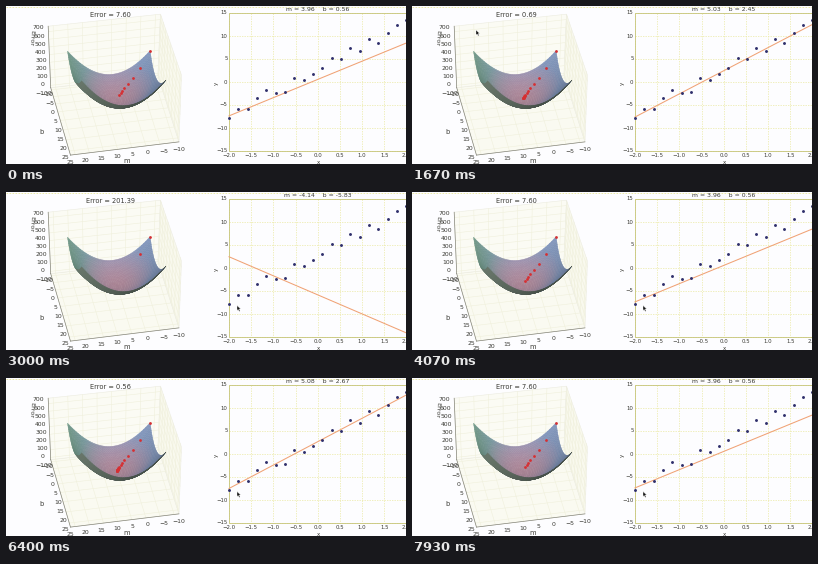
A matplotlib script for the animation above (8 s loop, 400x158 px).

```python
import numpy as np
import matplotlib.pyplot as plt
from matplotlib.animation import FuncAnimation
from matplotlib.collections import PolyCollection
from matplotlib.patches import Polygon, Rectangle

W, H, DPI = 400, 158, 100
FRAMES, INTERVAL = 160, 50
M_FIT, B_FIT, NOISE, X_VAR = 5.10, 2.83, 0.5335, 28 / 19
START, RATE = -8, 0.2
CYCLE, STEP_MS, RESTART = 21, 185, 2530

fig = plt.figure(figsize=(W / DPI, H / DPI), dpi=DPI, facecolor="#fdfdff")
ax = fig.add_axes([0, 0, 1, 1])
ax.set_xlim(0, W)
ax.set_ylim(H, 0)
ax.axis("off")


def label(x, y, s, size=4.4, ha="center", rot=0, color="#3a3a34", z=6):
    return ax.text(x, y, s, fontsize=size, ha=ha, va="center", rotation=rot,
                   color=color, zorder=z)


def signed(v):
    return str(v).replace("-", "\u2212")


def line(xs, ys, color, lw=0.5, z=1, **kw):
    return ax.plot(xs, ys, color=color, lw=lw, zorder=z, **kw)[0]


def error(m, b):
    return NOISE + X_VAR * (m - M_FIT) ** 2 + (b - B_FIT) ** 2


def project(m, b, z):
    """Perspective view of (m, b, error) in stage pixels."""
    u, v = (25 - m) / 35, (b + 10) / 35
    w = 0.75 * v / (1 - 0.25 * v)
    x = (1 - u) * (50 + 18 * w) + u * (148 + 19 * w) + z / 700 * 4 * (u - 0.5)
    y = (1 - u) * (81 + 61 * w) + u * (70 + 60 * w) - z * (0.077 + 0.006 * w)
    return x, y


def mix(a, b, t):
    return np.array(a) * (1 - t) + np.array(b) * t


# ---- error surface -------------------------------------------------------
LO, HI, BASE, TOP = -11.7, 26.7, -30, 770
PANES = [([(HI, LO, BASE), (LO, LO, BASE), (LO, HI, BASE), (HI, HI, BASE)], "#fafaf1"),
         ([(HI, LO, BASE), (LO, LO, BASE), (LO, LO, TOP), (HI, LO, TOP)], "#fbfbf4"),
         ([(LO, LO, BASE), (LO, HI, BASE), (LO, HI, TOP), (LO, LO, TOP)], "#f9f9ee")]
for corners, tone in PANES:
    ax.add_patch(Polygon([project(*c) for c in corners], facecolor=tone,
                         edgecolor="#ecece0", lw=0.4, zorder=0))


def grid3(*pts, color="#f0f0dc", lw=0.4):
    xs, ys = zip(*(project(*p) for p in pts))
    line(xs, ys, color, lw)


for t in range(-10, 30, 5):
    grid3((t, HI, BASE), (t, LO, BASE), (t, LO, TOP))
    grid3((HI, t, BASE), (LO, t, BASE), (LO, t, TOP))
for z in range(0, 800, 100):
    grid3((HI, LO, z), (LO, LO, z), (LO, HI, z))
for end in ((LO, HI, BASE), (HI, LO, BASE)):
    grid3((HI, HI, BASE), end, color="#85857a", lw=0.5)
grid3((HI, LO, BASE), (HI, LO, TOP), color="#85857a", lw=0.5)

for i in range(-1, 8):
    label(37 - 0.6 * i, 79 - 8.15 * i, signed(100 * i))
for i in range(8):
    label(64 + 15.57 * i, 156 - 1.8 * i, signed(25 - 5 * i))
    label(41 + 2.7 * i, 88 + 9.1 * i, signed(5 * i - 10))
label(36, 126, "b", 4.8)
label(121, 155, "m", 4.8)
label(25, 32, "Error", 4.6, rot=266)


def surface():
    grid = np.linspace(-8, 20.8, 41)
    quads, tones = [], []
    for b0, b1 in zip(grid, grid[1:]):
        for m1, m0 in zip(grid[::-1], grid[-2::-1]):
            q = np.array([project(m, b, error(m, b))
                          for m, b in ((m1, b0), (m0, b0), (m0, b1), (m1, b1))])
            d, e = q[2] - q[0], q[3] - q[1]
            m, b = (m0 + m1) / 2, (b0 + b1) / 2
            u, v = (20.8 - m) / 28.8, (b + 8) / 28.8
            if d[0] * e[1] - d[1] * e[0] > 0:
                rim = mix((110, 148, 132), (126, 146, 182), min(1, 2 * u))
                c = mix((178, 138, 156), rim, min(1, error(m, b) / 230))
                c = c * (1.04 - 0.25 * v)
            else:
                c = mix((104, 118, 106), (70, 80, 72), min(1, 1.6 * u))
            quads.append(q)
            tones.append(np.clip(c / 255, 0, 1))
    return PolyCollection(quads, facecolors=tones, edgecolors=tones,
                          linewidths=0.3, zorder=2)


ax.add_collection(surface())
path = line([], [], "#d62f32", 0, 4, marker="o", ms=2.0, mew=0)
err_title = label(104.5, 8.6, "", 4.8)

# ---- regression plot -----------------------------------------------------
X0, Y0, SX, SY = 311.7, 76, 44.35, 4.6


def plot_xy(x, y):
    return X0 + SX * np.asarray(x), Y0 - SY * np.asarray(y)


DOTS = dict(linestyle=(0, (2, 1.6)))
for i in range(-4, 5):
    x = X0 + SX * i / 2
    line([x, x], [7, 145], "#ebe9a4", 0.5, **DOTS)
    label(x, 149.5, signed(i / 2), 3.9)
for v in range(-15, 16, 5):
    y = Y0 - SY * v
    line([223, W], [y, y], "#ebe9a4", 0.5, **DOTS)
    label(221.5, y, signed(v), 3.9, "right")
ax.add_patch(Rectangle((223, 7), 178, 138, fill=False, edgecolor="#c6c478",
                       lw=0.6, zorder=2))
label(312, 156, "x", 4)
label(210, 77, "y", 4, rot=90)
line([0, W], [0.5, 0.5], "#e9e79a", 0.6, **DOTS)

heights = [112, 103, 102.5, 92, 84, 86.5, 85.5, 72, 74, 68,
           62, 51.5, 53, 42, 45, 32.5, 37, 26.5, 19, 13.5]
xs, _ = plot_xy(np.linspace(-2, 2, 20), 0)
line(xs, heights, "#30306c", 0, 4, marker="o", ms=2.1, mew=0)
fit = line([], [], "#f0a275", 0.75, 3)
fit_title = label(312, 3.4, "", 4.4)

# ---- pointers and capture loupe ------------------------------------------
ARROW = np.array([(0, 0), (0, 5), (1.2, 4), (2.2, 6), (3.1, 5.5), (2.2, 3.6), (3.6, 3.4)])


def pointer():
    return ax.add_patch(Polygon(ARROW, facecolor="#151515", edgecolor="white",
                                lw=0.25, zorder=9))


def put(p, x, y, shown=True):
    p.set_xy(ARROW + (x, y))
    p.set_visible(bool(shown))


hand, second = pointer(), pointer()
loupe = [
    ax.add_patch(Rectangle((8, 0.5), 38, 41.5, facecolor="#fdfefe",
                           edgecolor="#a9dcdc", lw=0.5, zorder=7)),
    line([25.5, 25.5], [1, 42], "#8fd3d6", 0.6, 8),
    line([8, 46], [14, 14], "#8fd3d6", 0.6, 8),
    ax.add_patch(Rectangle((8, 42), 36, 12, facecolor="#4d4f4b",
                           edgecolor="none", zorder=8)),
    label(26, 45.5, "812 , 271 (RGB)", 2.8, color="#dddddd", z=9),
    label(26, 50.5, "Start region", 2.8, color="#dddddd", z=9),
]


def ease(t, a, b):
    s = min(max((t - a) / (b - a), 0), 1)
    return s * s * (3 - 2 * s)


def step_at(t):
    if t < RESTART:
        return min(15, 7 + (t + 105) // STEP_MS)
    return max((t - RESTART) // STEP_MS - 1, 0) % CYCLE


def draw(frame):
    t = frame * INTERVAL
    n = np.arange(step_at(t) + 1)
    m = M_FIT + (START - M_FIT) * (1 - RATE * X_VAR) ** n
    b = B_FIT + (START - B_FIT) * (1 - RATE) ** n
    path.set_data(*project(m, b, error(m, b)))
    err_title.set_text(f"Error = {error(m[-1], b[-1]):.2f}")
    fit_title.set_text(f"m = {m[-1]:.2f}    b = {b[-1]:.2f}")
    ends = np.array([-2, 2])
    fit.set_data(*plot_xy(ends, m[-1] * ends + b[-1]))

    if t < RESTART:
        s = ease(t, 1000, 1500)
        put(hand, 120 - 56 * s, 4 + 20 * s, t >= 1200)
    else:
        put(hand, 231, 113.5)
    s = ease(t, 1900, 2200)
    put(second, 64 - 14 * s, 24 - 16 * s, 1900 <= t < RESTART)
    for part in loupe:
        part.set_visible(2150 <= t < RESTART)
    return [path, err_title, fit_title, fit, hand, second, *loupe]


anim = FuncAnimation(fig, draw, frames=FRAMES, interval=INTERVAL,
                     repeat=True, repeat_delay=0, blit=False)
plt.show()
```
